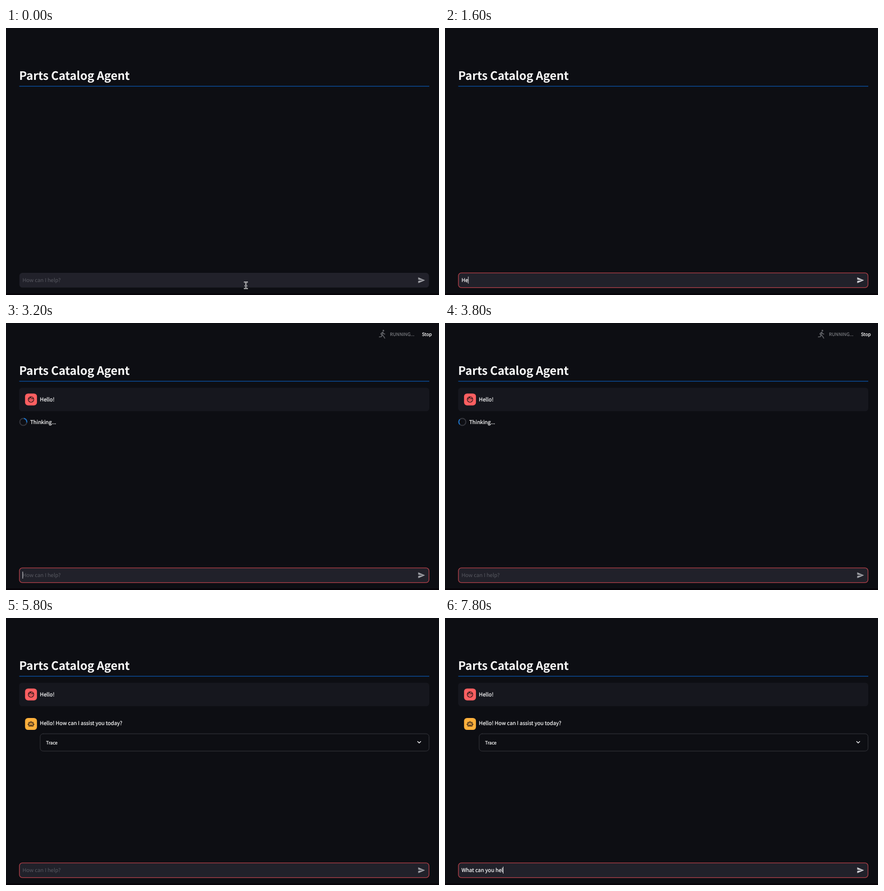
Write an HTML page that moves like this. It is 800 px wide and 494 px high and loops after 8000 ms.

```html
<!DOCTYPE html>
<html lang="en">
<head>
<meta charset="utf-8">
<title>Parts Catalog Agent</title>
<style>
  html, body { margin: 0; width: 100%; height: 100%; overflow: hidden; background: #0d0e13; }
  svg { display: block; width: 800px; height: 494px; }
  text {
    font: 9.71px "Noto Sans CJK JP", "Noto Sans CJK SC", "Noto Sans CJK", "Open Sans", sans-serif;
    fill: #fafafa; stroke: #fafafa; stroke-width: .22px;
    text-rendering: geometricPrecision; white-space: pre;
  }
  .title { font-size: 21.5px; font-weight: 700; letter-spacing: -.15px; stroke: none; }
  .small { font-size: 8.49px; }
  .muted { fill: #85868b; stroke: #85868b; stroke-width: .1px; }
  #hint { fill: #595a62; stroke: none; }
  .line { fill: none; stroke-linecap: round; stroke-linejoin: round; }
  .icon { stroke: #1b1214; stroke-width: 2; }
  .runner { fill: #65666b; }
  .runner .line { stroke: #65666b; stroke-width: 2; }
</style>
</head>
<body>
<svg viewBox="0 0 800 494">
  <rect width="800" height="494" fill="#0d0e13"/>
  <rect y="491" width="800" height="3" fill="#07050a"/>

  <text class="title" x="24.3" y="95.8">Parts Catalog Agent</text>
  <rect x="24.5" y="107" width="757.5" height="1.4" fill="#0a4b97"/>

  <g id="status">
    <g class="runner" transform="translate(686.3 11.2) scale(.75)">
      <path d="M13.49 5.48c1.1 0 2-.9 2-2s-.9-2-2-2-2 .9-2 2 .9 2 2 2zm-3.6 13.9l1-4.4 2.1 2v6h2v-7.5l-2.1-2 .6-3c1.3 1.5 3.3 2.5 5.5 2.5v-2c-1.9 0-3.5-1-4.3-2.4l-1-1.6c-.4-.6-1-1-1.7-1-.3 0-.5.1-.8.1l-5.2 2.2v4.7h2v-3.4l1.8-.7-1.6 8.1-4.9-1-.4 2 7 1.4z"/>
    </g>
    <g class="runner" transform="translate(686.3 11.2) scale(.75)">
      <circle cx="14.6" cy="3.8" r="2.1"/>
      <path class="line" stroke-width="3" d="M13 8L11.6 14"/>
      <path class="line" d="M12.6 8L8.4 11.4L9.6 14M13.6 8.5L15 11.5L18 12.5M11.8 14L15 17.5L18 22.5M11.5 14.5L10 18.6L4.6 19.4"/>
    </g>
    <g class="runner" transform="translate(686.3 11.2) scale(.75)">
      <circle cx="14" cy="3.6" r="2.1"/>
      <path class="line" stroke-width="3" d="M12.4 8L11.4 14"/>
      <path class="line" d="M12 8L8 10.4L7 14M13 8.5L15 12L18 12M11.6 14L14.6 17L13.6 22.5M11 14.5L10.4 19L5 20.6"/>
    </g>
    <text class="small muted" x="709.3" y="24">RUNNING...</text>
    <text class="small" x="768.5" y="24">Stop</text>
  </g>

  <g id="question">
    <rect x="24.3" y="119.7" width="757.7" height="43.6" rx="5.5" fill="#16171e"/>
    <rect x="35.2" y="130.4" width="22" height="22" rx="5.4" fill="#ff5f61"/>
    <g transform="translate(39.4 134.6) scale(.565)">
      <circle class="line icon" cx="12" cy="12" r="9"/>
      <path class="line icon" d="M4 11.2C7.5 10.2 9.6 7.6 10.3 4.6C12 8 15.5 9.8 20 9.2"/>
      <circle cx="9" cy="13.4" r="1.4" fill="#1b1214"/>
      <circle cx="15" cy="13.4" r="1.4" fill="#1b1214"/>
    </g>
    <text x="62.6" y="145.3">Hello!</text>
  </g>

  <g id="thinking">
    <g class="line" stroke-width="2" transform="translate(32 183)">
      <circle r="6.5" stroke="#34353c"/>
      <path id="arc" d="M-4.6 4.6A6.5 6.5 0 0 1 -4.6 -4.6" stroke="#1a6fc4" stroke-linecap="butt"/>
    </g>
    <text x="44.8" y="186.8">Thinking...</text>
  </g>

  <g id="answer">
    <rect x="35.2" y="185" width="22" height="22" rx="5.4" fill="#ffb03c"/>
    <g class="line icon" transform="translate(39.4 189.2) scale(.565)">
      <path d="M5 7H19V19H5ZM12 3.4V7M2.4 12V14.4M21.6 12V14.4M8.6 16H15.4"/>
      <path stroke-width="2.8" d="M9 11.4h.01M15 11.4h.01"/>
    </g>
    <text x="62.6" y="197.7">Hello! How can I assist you today?</text>
    <rect class="line" x="63.1" y="214.2" width="718.5" height="32" rx="5.4" stroke="#34353b"/>
    <text class="small" x="74" y="233.6">Trace</text>
    <path class="line" stroke="#ececee" stroke-width="1.4" d="M760.6 228.5L763.4 231.2L766.2 228.5"/>
  </g>

  <rect id="box" x="24.8" y="453.1" width="756.7" height="27.2" rx="5.4" fill="#21212a" stroke-width="1.3"/>
  <text id="hint" x="30.4" y="470.2">How can I help?</text>
  <text id="typed" x="30.4" y="470.2"></text>
  <rect id="caret" y="460" width="1" height="13" fill="#d6d6da"/>
  <path id="send" transform="translate(760.4 459.5) scale(.6)" d="M2.01 21L23 12 2.01 3 2 10l15 2-15 2z"/>

  <g id="pointer" class="line">
    <path id="beam" d="M-2.6 -6Q-.4 -6 0 -4.6Q.4 -6 2.6 -6M-2.6 6Q-.4 6 0 4.6Q.4 6 2.6 6M0 -4.6V4.6M-1.4 1H1.4" stroke="#fff" stroke-width="2.2"/>
    <path d="M-2.6 -6Q-.4 -6 0 -4.6Q.4 -6 2.6 -6M-2.6 6Q-.4 6 0 4.6Q.4 6 2.6 6M0 -4.6V4.6M-1.4 1H1.4" stroke="#15151a" stroke-width=".8"/>
  </g>
</svg>
<script>
  const LOOP = 8000, STEP = 200;
  const FOCUS = 1000, SUBMIT = 2800, THINK = 3000, RUN = 3200, REPLY = 5400;
  const $ = id => document.getElementById(id);
  const show = (el, on) => el.style.display = on ? "" : "none";
  const runners = [...document.querySelectorAll(".runner")];

  // Part of a line typed between two times
  const typing = (line, from, to, t) =>
    line.slice(0, Math.max(0, Math.round(line.length * (t - from) / (to - from))));

  function draw(t) {
    const text = t < SUBMIT
      ? typing("Hello!\u00a0", 1200, 2400, t)
      : typing("What can you hel", 6400, 7800, t);
    const typed = $("typed");
    typed.textContent = text;

    show($("hint"), !text);
    show($("caret"), t >= FOCUS && (text || t % 1000 < 500));
    $("caret").setAttribute("x", 30.4 + (text ? typed.getComputedTextLength() - .3 : 0));
    $("send").setAttribute("fill", text ? "#d0d0d4" : "#a0a1a7");
    $("box").setAttribute("stroke", t < FOCUS ? "none" : t < FOCUS + STEP ? "#9a3944" : "#ae3f48");

    const move = Math.min(t / 400, 1);
    $("pointer").setAttribute("transform", `translate(${443.2 - 20 * move} ${476.2 - 10.6 * move})`);
    show($("pointer"), t < 1400);

    show($("question"), t >= SUBMIT);
    show($("thinking"), t >= THINK && t < REPLY);
    show($("status"), t >= RUN && t < REPLY);
    show($("answer"), t >= REPLY);

    $("arc").setAttribute("transform", `rotate(${(t - 3800) * .36})`);
    runners.forEach((r, i) => show(r, t / STEP % 3 === i));
  }

  function tick() {
    draw(Math.floor(performance.now() % LOOP / STEP) * STEP);
    requestAnimationFrame(tick);
  }
  tick();
</script>
</body>
</html>
```
